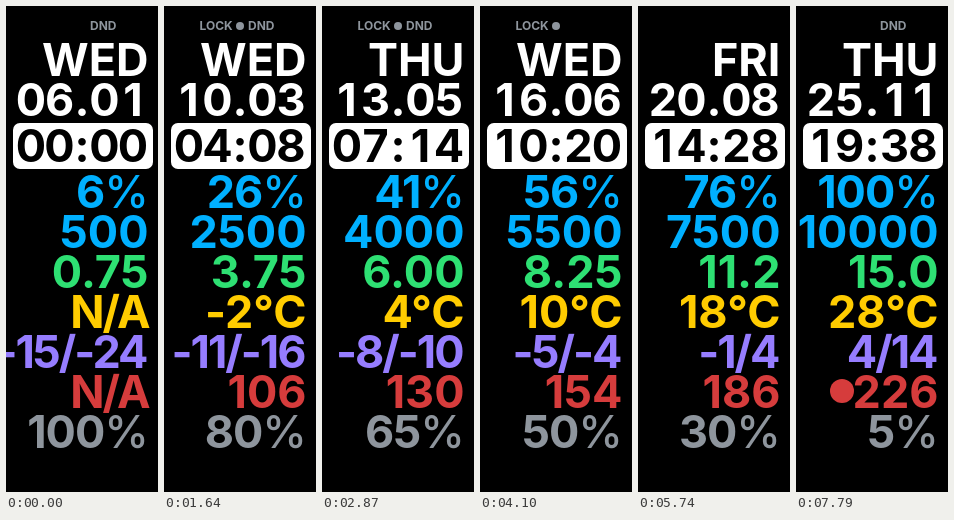
These frames come from a looping animation (152 by 486 pixels, 8200 ms). An HTML page:

```html
<!DOCTYPE html>
<html lang="en">
<head>
<meta charset="utf-8">
<title>Watch data column</title>
<style>
  html, body { margin: 0; width: 100%; height: 100%; overflow: hidden; background: #000; }
  svg { display: block; }
  text { font: 700 45px Inter, sans-serif; text-anchor: end; font-feature-settings: "calt" 0; }
  .cells { text-anchor: middle; font-kerning: none; font-feature-settings: "calt" 1; }
  .tight { letter-spacing: -2px; }
  .percent { letter-spacing: -1px; }
  .percent tspan { font-weight: 500; }
  .status { font: 700 12px Inter, sans-serif; text-anchor: start; fill: #8e959d; }
</style>
</head>
<body>
<svg id="face" width="152" height="486" viewBox="0 0 152 486">
  <text id="lock" class="status" x="35.5" y="24">LOCK</text>
  <circle id="link" cx="76" cy="20" r="4" fill="#8e959d"/>
  <text id="dnd" class="status" x="84" y="24">DND</text>
  <rect x="7" y="117" width="140" height="46" rx="7" fill="#fff"/>
  <circle id="alert" cx="46" cy="385" r="12" fill="#d63c3c"/>
</svg>
<script>
const STEP = 410, COUNT = 20;
const $ = id => document.getElementById(id);
const pad = n => String(n).padStart(2, "0");
const DAYS = ["SUN", "MON", "TUE", "WED", "THU", "FRI", "SAT"];
const CELLS = "25 53.5 76 98.5 127"; // centres of fixed-width digits
const month = i => 1 + Math.ceil(i / 2);
const percent = n => `${n}<tspan>%</tspan>`;

function distance(i) {
  const km = 0.75 * (i + 1);
  return km < 10 ? km.toFixed(2) : (Math.floor(km * 10) / 10).toFixed(1);
}

// colour, text at step i, style, x
const ROWS = [
  ["#fff", i => DAYS[new Date(2021, month(i) - 1, 6 + i).getDay()]],
  ["#fff", i => `${pad(6 + i)}.${pad(month(i))}`, "cells", CELLS],
  ["#000", i => `${pad(i)}:${pad(2 * i)}`, "cells", CELLS],
  ["#00b0ff", i => percent(Math.min(100, 6 + 5 * i)), "percent", 142],
  ["#00b0ff", i => `${500 * (i + 1)}`],
  ["#2ee073", distance],
  ["#ffcc00", i => i ? `${2 * i - 10}°C` : "N/A", i => i ? "" : "tight"],
  ["#967dff", i => `${i - 15}/${2 * i - 24}`, "tight", 140.5],
  ["#d63c3c", i => i ? `${74 + 8 * i}` : "N/A", i => i ? "" : "tight"],
  ["#8e959d", i => percent(100 - 5 * i), "percent", 142]
].map(([fill, value, style = "", x = 142.5], n) => {
  const el = document.createElementNS("http://www.w3.org/2000/svg", "text");
  el.setAttribute("x", x);
  el.setAttribute("y", n === 2 ? 156 : n < 2 ? 70 + 40 * n : 82 + 40 * n);
  el.setAttribute("fill", fill);
  $("face").append(el);
  return { el, value, style };
});

const show = (id, on) => $(id).setAttribute("visibility", on ? "visible" : "hidden");

function draw(i) {
  for (const { el, value, style } of ROWS) {
    el.innerHTML = value(i);
    el.setAttribute("class", typeof style === "function" ? style(i) : style);
  }
  show("lock", i >= 4 && i < 13);
  show("link", i >= 2 && i < 11);
  show("dnd", i < 8 || i >= 17);
  show("alert", 74 + 8 * i > 220);
}

let last = -1;
function tick() {
  const i = Math.floor(performance.now() / STEP) % COUNT;
  if (i !== last) draw(last = i);
  requestAnimationFrame(tick);
}
tick();
</script>
</body>
</html>
```
